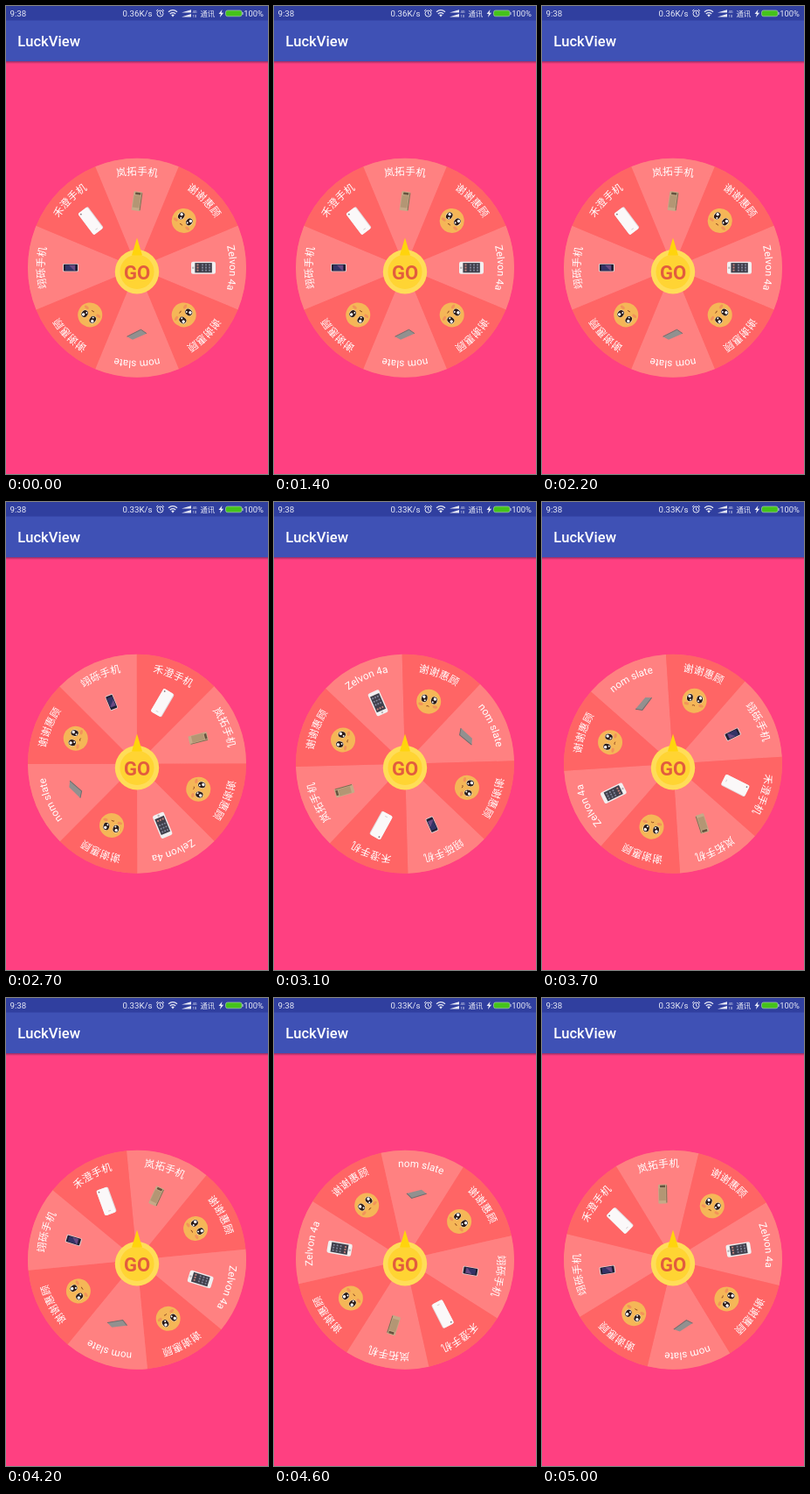
Animation of 300x534 px, one loop 5.1 s. Source, as an HTML page:

```html
<!DOCTYPE html>
<html lang="zh">
<head>
<meta charset="utf-8">
<style>
  html, body { margin: 0; width: 100%; height: 100%; overflow: hidden; background: #ff4081; }
  svg { display: block; width: 300px; height: 534px; font-family: Roboto, "Noto Sans CJK SC", "Noto Sans CJK", sans-serif; }
</style>
</head>
<body>
<svg viewBox="0 0 300 534" fill="#fff">
  <defs>
    <path id="arc" d="M-60-87.4A106 106 0 0 1 60-87.4"/>
    <linearGradient id="shadow" x2="0" y2="1">
      <stop stop-color="#402050" stop-opacity=".55"/>
      <stop offset="1" stop-color="#402050" stop-opacity="0"/>
    </linearGradient>
    <g id="face" transform="rotate(-8)">
      <circle r="14" fill="#f5b657"/>
      <g id="eye">
        <ellipse cx="-5.8" cy="-2.6" rx="3.9" ry="4.6" fill="#fff3df"/>
        <ellipse cx="-5.7" cy="-2.6" rx="3.4" ry="4.2" fill="#2b1b18"/>
        <circle cx="-6.4" cy="-4.2" r="1.7"/>
        <circle cx="-4.6" cy="-.4" r="1"/>
        <ellipse cx="-8.4" cy="4.6" rx="2.8" ry="1.6" fill="#f3935a"/>
      </g>
      <use href="#eye" transform="scale(-1 1)"/>
      <path d="M-1.6 5.6q1.6-1.2 3.2 0" fill="none" stroke="#8a4520" stroke-width=".9"/>
    </g>
    <g id="gold" transform="rotate(8)">
      <rect x="-5" y="-11" width="10" height="22" rx="1.2" fill="#c6a988"/>
      <rect x="-4.2" y="-6.5" width="7.6" height="14" fill="#b39674"/>
      <rect x="-3" y="-10" width="6" height="2.6" fill="#65533f"/>
      <path d="M4.5-10v20" stroke="#806a52"/>
    </g>
    <g id="silver">
      <rect x="-7" y="-14" width="14" height="28" rx="2.2" fill="#f1eff0"/>
      <rect x="-5.6" y="-9.8" width="11.2" height="19.4" fill="#41404c"/>
      <path d="M-4.2-7H4.2M-4.2-3H4.2M-4.2 1H4.2" stroke="#83869b" stroke-width="1.8" stroke-dasharray="1.8 1.3"/>
      <path d="M-4.2 6.5H4.2" stroke="#c5837d" stroke-width="2" stroke-dasharray="1.8 1.3"/>
      <circle cy="11.8" r="1.2" fill="#b9b4b6"/>
    </g>
    <g id="laptop">
      <path d="M-11 1 5-6 11.5-2.5-4.5 5.5Z" fill="#92908f"/>
      <path d="M-11 1-4.5 5.5 11.5-2.5" fill="none" stroke="#706d6d"/>
    </g>
    <g id="dark">
      <rect x="-4.6" y="-9" width="9.2" height="18" rx="1.4" fill="#e4cfd2"/>
      <rect x="-3.9" y="-8" width="7.8" height="16" rx=".8" fill="#221f32"/>
      <path d="M-3.2-6h6.4V5.5h-6.4Z" fill="#343367"/>
      <path d="M-3 4 3-2V5H-3Z" fill="#6a4a83"/>
    </g>
    <g id="white" transform="translate(.6 .6) rotate(8)">
      <rect x="-7.2" y="-15.2" width="14.2" height="30.4" rx="2" fill="#e2d9dc"/>
      <rect x="-7.2" y="-15.2" width="13.2" height="30.4" rx="2" fill="#fbf8f9"/>
      <circle cx="-4.6" cy="-12.6" r=".9" fill="#857b81"/>
      <path d="M-2 11.5H1" stroke="#d8d0d3"/>
    </g>
  </defs>

  <path fill="#ff4081" d="M0 0h300v534H0z"/>
  <path fill="url(#shadow)" d="M0 63h300v3H0z"/>
  <path fill="#3f51b5" d="M0 16h300v47H0z"/>
  <path fill="#303f9f" d="M0 0h300v16.5H0z"/>
  <text x="13.3" y="46.2" font-size="16.6" font-weight="500">LuckView</text>

  <g font-size="9.7" fill="#e8eaf6">
    <text x="4.5" y="12">9:38</text>
    <text id="rate" x="133.5" y="12"></text>
    <text x="222.4" y="11.8" font-size="8.4">通讯</text>
    <text x="272.2" y="12" font-size="9.4">100%</text>
    <text x="213.5" y="8" font-size="4.2">4G</text>
    <text x="213.5" y="12.6" font-size="4.2">1X</text>
    <g fill="none" stroke="#e8eaf6">
      <circle cx="176.5" cy="8.6" r="3.5"/>
      <path d="M176.5 6.5v2.3l1.6 1M172 5.8l2.2-2M181 5.8l-2.2-2"/>
      <path d="M186 6.8q5-4.2 10 0M187.8 9q3.2-2.6 6.4 0" stroke-width="1.3"/>
    </g>
    <path d="M189.2 10.2q1.8-1.4 3.6 0L191 12.4ZM201 7.6l11-3.4v3.4ZM201 12.4l11-3.4v3.4ZM247.5 4l-4 5h2.4l-1 4 4.2-5.2h-2.4Z"/>
    <rect x="251.5" y="5" width="18.6" height="6.8" rx="2.2" fill="#45c31b" stroke="#a9c7b4" stroke-width=".7"/>
    <path d="M270.6 7h.8v3h-.8z"/>
  </g>

  <g transform="translate(150 298.7)"><g id="wheel"></g></g>

  <circle cx="150" cy="303.3" r="25.2" fill="#ffdd58"/>
  <circle cx="150" cy="303.3" r="19.6" fill="#ffd433"/>
  <path fill="#ffd40c" d="M150 264.5 156 284.5h-12Z"/>
  <text x="150" y="311.5" font-size="22" font-weight="700" fill="#e25c3e" text-anchor="middle">GO</text>
</svg>
<script>
const LOOP = 5100, TICK = 100;
const SPIN_START = 2549, SPEED = 0.4464;   // ms, degrees per ms
const BRAKE_START = 4200, BRAKE = 36e-6;   // degrees per ms squared
const none = ['谢谢惠顾', 'face'];
const prizes = [
  ['岚拓手机', 'gold'], none, ['Zelvon 4a', 'silver'], none,
  ['nom slate', 'laptop'], none, ['翊砾手机', 'dark'], ['禾澄手机', 'white']
];
const wheel = document.getElementById('wheel');
const rate = document.getElementById('rate');

const edgeX = 125 * Math.sin(Math.PI / 8), edgeY = -125 * Math.cos(Math.PI / 8);
wheel.innerHTML = '<circle r="124.8" fill="#ff7373"/>' + prizes.map(([label, icon], i) => `
  <g transform="rotate(${i * 45})">
    <path fill="${i % 2 ? '#ff6565' : '#ff8181'}" d="M0 0L${-edgeX} ${edgeY}A125 125 0 0 1 ${edgeX} ${edgeY}Z"/>
    <text font-size="11.7" text-anchor="middle"><textPath href="#arc" startOffset="50%">${label}</textPath></text>
    <use href="#${icon}" y="-76"/>
  </g>`).join('');

function angleAt(t) {
  const spin = Math.max(0, t - SPIN_START) * SPEED;
  const braking = Math.max(0, t - BRAKE_START);
  return spin - BRAKE * braking * braking;
}

function draw(now) {
  const t = Math.floor(now % LOOP / TICK) * TICK;
  wheel.setAttribute('transform', `rotate(${angleAt(t)})`);
  rate.textContent = t < 2500 ? '0.36K/s' : '0.33K/s';
  requestAnimationFrame(draw);
}
draw(performance.now());
</script>
</body>
</html>
```
